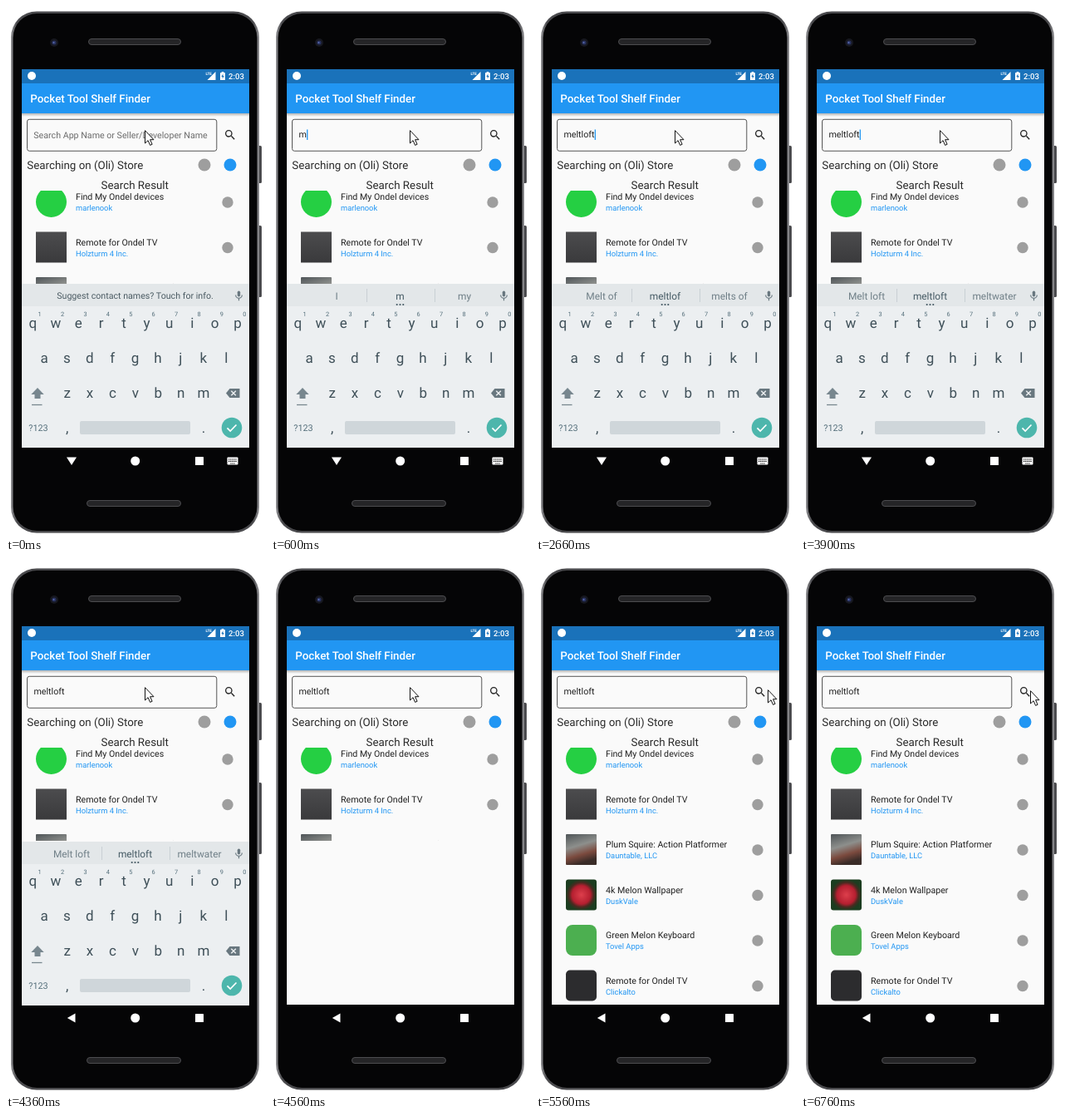
An HTML page for the animation above (8000 ms loop, 312 by 636 pixels).

```html
<!DOCTYPE html>
<html lang="en">
<head>
<meta charset="utf-8">
<title>Pocket Tool Shelf Finder</title>
<style>
html, body { margin: 0; width: 100%; height: 100%; overflow: hidden; background: #fff; }
svg { display: block; width: 312px; height: 636px; font-family: Roboto, "Open Sans", sans-serif; text-rendering: geometricPrecision; }
.mid { text-anchor: middle; }
.big { font-size: 13.33px; fill: #2b2b2b; }
.body { font-size: 10.67px; fill: #212121; }
.sub { font-size: 9.33px; fill: #2196f3; }
.key { font-size: 17px; fill: #3f5059; }
.num { font-size: 7.4px; fill: #546e7a; }
.sug { font-size: 11.9px; fill: #6f7f87; }

#hint, #pointer, #splash, #board, #clip, .down, .back { animation: 8s linear infinite; }
#hint { animation-name: hint; }
#pointer { animation-name: point; }
#splash { animation-name: splash; transform-origin: 270px 155px; }
#board { animation-name: board; animation-timing-function: step-end; }
#clip { animation-name: grow; animation-timing-function: step-end; }
.down { animation-name: hide; animation-timing-function: step-end; }
.back { animation-name: show; animation-timing-function: step-end; }

@keyframes hint { 0%, 3.5% { opacity: 1; } 7.5%, 100% { opacity: 0; } }
@keyframes point {
  0%, 66.3% { transform: translate(167px, 149px); animation-timing-function: ease-in-out; }
  69.3%, 71.7% { transform: translate(279px, 152px); }
  72.8%, 100% { transform: translate(276px, 153px); }
}
@keyframes splash {
  0%, 80.6% { transform: scale(.4); opacity: 0; }
  80.75% { transform: scale(.6); opacity: .12; }
  81.6%, 83.2% { transform: scale(1); opacity: .17; }
  84.3%, 100% { transform: scale(1); opacity: 0; }
}
@keyframes board {
  0% { transform: none; opacity: 1; }
  54.4% { transform: translateY(1px); opacity: 1; }
  56.2% { transform: translateY(6px); opacity: .5; }
  56.9%, 100% { transform: translateY(6px); opacity: 0; }
}
@keyframes grow { 0% { height: 112px; } 58.2%, 100% { height: 309px; } }
@keyframes hide { 0% { visibility: visible; } 53.7%, 100% { visibility: hidden; } }
@keyframes show { 0% { visibility: hidden; } 53.7%, 100% { visibility: visible; } }
</style>
</head>
<body>
<svg viewBox="0 0 312 636">
  <defs>
    <linearGradient id="rim" x2="1">
      <stop stop-color="#8c8c8f"/><stop offset=".025" stop-color="#4a4a4d"/>
      <stop offset=".975" stop-color="#4a4a4d"/><stop offset="1" stop-color="#8c8c8f"/>
    </linearGradient>
    <linearGradient id="shade" x2="0" y2="1">
      <stop stop-color="#000" stop-opacity=".28"/><stop offset="1" stop-color="#000" stop-opacity="0"/>
    </linearGradient>
    <linearGradient id="slate" x2="0" y2="1"><stop stop-color="#4c4c4e"/><stop offset="1" stop-color="#3a3a3c"/></linearGradient>
    <linearGradient id="dusk" x2=".3" y2="1">
      <stop stop-color="#4f5558"/><stop offset=".45" stop-color="#8d8f8c"/>
      <stop offset=".75" stop-color="#7b4a3e"/><stop offset="1" stop-color="#3a2c28"/>
    </linearGradient>
    <radialGradient id="fruit">
      <stop stop-color="#dd3f4c"/><stop offset=".6" stop-color="#b51f30"/>
      <stop offset=".8" stop-color="#4a2a20"/><stop offset="1" stop-color="#1c3d20"/>
    </radialGradient>
    <clipPath id="listClip"><rect id="clip" x="19" y="222" width="274" height="112"/></clipPath>
    <clipPath id="inkClip"><rect x="253.5" y="130" width="39.5" height="50"/></clipPath>
  </defs>

  <!-- phone -->
  <g fill="#4b4b4e">
    <rect x="302" y="168" width="6" height="45" rx="1.5"/>
    <rect x="302" y="264" width="6" height="86" rx="1.5"/>
  </g>
  <rect x="6" y="6.500" width="299" height="627" rx="31" fill="url(#rim)"/>
  <rect x="8.500" y="9" width="294" height="622" rx="29" fill="#050506"/>
  <circle cx="58" cy="44" r="5" fill="#17181f"/>
  <circle cx="58" cy="44" r="2.600" fill="#27305c"/>
  <circle cx="57.500" cy="44" r="1.100" fill="#5b6bb0"/>
  <g fill="#252527" stroke="#4c4c4f">
    <rect x="99.500" y="39.500" width="111" height="7" rx="3.500"/>
    <rect x="97.500" y="594.500" width="113" height="7" rx="3.500"/>
  </g>

  <!-- app -->
  <rect x="19" y="76" width="274" height="455" fill="#fafafa"/>
  <rect x="19" y="129" width="274" height="4" fill="url(#shade)"/>
  <rect x="19" y="93" width="274" height="36" fill="#2196f3"/>
  <rect x="19" y="76" width="274" height="17" fill="#1a72ba"/>
  <g fill="#fff">
    <circle cx="31" cy="84" r="5"/>
    <text x="240.500" y="83" font-size="4.600" font-weight="700">LTE</text>
    <path d="M252.500 79v10h-10z"/>
    <path d="M259.700 79h2.600v1.200h1.700V89h-6v-8.800h1.700z"/>
    <path d="M261.400 81.500l-2 3.500h1.300v2.500l2-3.500h-1.300z" fill="#1a72ba"/>
    <text x="268" y="87.700" font-size="9.600" font-weight="500">2:03</text>
    <text x="29.300" y="115.500" font-size="13.330" font-weight="500">Pocket Tool Shelf Finder</text>
  </g>

  <g clip-path="url(#inkClip)"><circle id="splash" cx="270" cy="155" r="23"/></g>
  <rect x="25.500" y="136.300" width="228.300" height="38" rx="2.700" fill="none" stroke="#555"/>
  <text id="hint" class="body" x="33.300" y="158.500" style="fill:#6c6c6c">Search App Name or Seller/Developer Name</text>
  <text id="typed" class="body" x="33.500" y="158.200"></text>
  <rect id="caret" y="148.500" width="1.300" height="12.500" fill="#2196f3"/>
  <path transform="translate(262 147) scale(.667)" fill="#222" d="M15.500 14h-.79l-.28-.27A6.470 6.470 0 0 0 16 9.500 6.500 6.500 0 1 0 9.500 16c1.610 0 3.090-.59 4.230-1.570l.27.28v.79l5 4.990L20.490 19zm-6 0a4.500 4.500 0 1 1 0-9 4.500 4.500 0 0 1 0 9z"/>

  <text class="big" x="25.300" y="196">Searching on (Oli) Store</text>
  <circle cx="239" cy="191" r="7.500" fill="#9e9e9e"/>
  <circle cx="270" cy="191" r="7.500" fill="#2196f3"/>
  <text class="big mid" x="155.300" y="220">Search Result</text>
  <g clip-path="url(#listClip)"><g id="list"></g></g>

  <!-- navigation -->
  <g fill="#fff">
    <path class="down" d="M73 542.500h12l-6 9.500z"/>
    <path class="back" d="M83.500 541.500v11l-9.700-5.500z"/>
    <circle cx="155.700" cy="547" r="5.500"/>
    <rect x="228" y="542" width="10" height="10" rx=".6"/>
    <g class="down">
      <rect x="266.500" y="542.500" width="13" height="9" rx="1"/>
      <path d="M268 545h10M268 547.300h10M270.300 550h5.400" stroke="#050506" stroke-width="1.200" stroke-dasharray="1.300 .8"/>
    </g>
  </g>

  <!-- keyboard -->
  <g id="board">
    <rect x="19" y="334" width="274" height="197" fill="#eceff1"/>
    <rect x="19" y="334" width="274" height="27" fill="#e3e7e9"/>
    <text id="ask" class="mid" x="155.500" y="352" font-size="10.670" fill="#4b5b63">Suggest contact names? Touch for info.</text>
    <g id="strip">
      <path d="M115.500 340v16M197.500 340v16" stroke="#c9d0d4"/>
      <text class="sug mid" x="79" y="352.500"></text>
      <text class="sug mid" x="155.500" y="352.500" style="fill:#455a64"></text>
      <text class="sug mid" x="233" y="352.500"></text>
      <g fill="#455a64"><circle cx="151.700" cy="359" r="1.100"/><circle cx="155.500" cy="359" r="1.100"/><circle cx="159.300" cy="359" r="1.100"/></g>
    </g>
    <g fill="none" stroke="#68777f" stroke-width="1.200">
      <rect x="278.800" y="342.500" width="3.400" height="7" rx="1.700" fill="#68777f" stroke="none"/>
      <path d="M276.700 347.500a3.800 3.800 0 0 0 7.600 0M280.500 351.300v3"/>
    </g>
    <g id="keys"></g>
    <path d="M38 459l7.700 8h-4.200v5h-7v-5h-4.200z" fill="#78878f"/>
    <path d="M31 479.500h12.500" stroke="#78878f" stroke-width="1.300"/>
    <path d="M269.500 460h12v11h-12l-4.500-5.500z" fill="#68777f"/>
    <path d="M271.300 462.700l5.600 5.600m0-5.600l-5.600 5.600" stroke="#eceff1" stroke-width="1.400"/>
    <text class="mid" x="39" y="510.500" font-size="10.800" fill="#546e7a">?123</text>
    <rect x="89" y="499" width="133" height="16" rx="2" fill="#cfd6da"/>
    <circle cx="272" cy="507" r="12.300" fill="#4db6ac"/>
    <path d="M266.500 507.300l3.700 3.700 7.300-7.500" fill="none" stroke="#fff" stroke-width="1.700"/>
  </g>

  <g id="pointer">
    <path d="M.5 .7v15.300l3.600-3.300 2.500 5.700 2.500-1.100-2.500-5.600h4.400z" fill="#fff" stroke="#111"/>
  </g>
</svg>
<script>
const LOOP = 8000;
const $ = id => document.getElementById(id);

function add(parent, tag, attrs, text = '') {
  const el = document.createElementNS('http://www.w3.org/2000/svg', tag);
  for (const name in attrs) el.setAttribute(name, attrs[name]);
  el.textContent = text;
  parent.append(el);
}

// title, seller, picture fill, corner radius
const apps = [
  ['Find My Ondel devices', 'marlenook', '#25cf43', 18.5],
  ['Remote for Ondel TV', 'Holzturm 4 Inc.', 'url(#slate)', 0],
  ['Plum Squire: Action Platformer', 'Dauntable, LLC', 'url(#dusk)', 1],
  ['4k Melon Wallpaper', 'DuskVale', 'url(#fruit)', 3],
  ['Green Melon Keyboard', 'Tovel Apps', '#4caf50', 8],
  ['Remote for Ondel TV', 'Clickalto', '#2c2c2e', 5]
];
apps.forEach(([title, seller, fill, rx], i) => {
  const y = 217 + 54.5 * i, list = $('list');
  add(list, 'rect', { x: 36, y, width: 37, height: 37, rx, fill });
  add(list, 'text', { class: 'body', x: 84, y: y + 16 }, title);
  add(list, 'text', { class: 'sub', x: 84, y: y + 29 }, seller);
  add(list, 'circle', { cx: 267, cy: y + 19, r: 6.7, fill: '#9e9e9e' });
});

const rows = [['qwertyuiop', 32.4, 387], ['asdfghjkl', 46, 429], ['zxcvbnm', 73.6, 471], [',', 73.6, 512.5], ['.', 238, 512.5]];
rows.forEach(([letters, x0, y], row) => [...letters].forEach((letter, i) => {
  const x = x0 + 27.4 * i;
  add($('keys'), 'text', { class: 'key mid', x, y }, letter);
  if (row === 0) add($('keys'), 'text', { class: 'num mid', x: x + 8.3, y: 373.3 }, (i + 1) % 10);
}));

// each entry holds from its time until the next one
const word = 'meltloft';
const lengths = [[0, 0], [160, 1], [1000, 2], [1230, 3], [1300, 4], [1500, 5], [1760, 6], [1930, 7], [2660, 8]];
const carets = [[0, 0], [160, 1], [2500, 0], [2660, 1], [3330, 0], [3900, 1], [4200, 0]];
const guesses = [
  [0, ''], [400, 'I|m|my'], [830, 'M|m|me'], [1230, 'Me|me|met'], [1400, 'Melt|melt|belt'],
  [1660, 'Melt l|meltl|melts'], [1860, 'Melt lo|meltlo|melt to'],
  [2130, 'Melt of|meltlof|melts of'], [2760, 'Melt loft|meltloft|meltwater']
];
const at = (track, t) => track.findLast(([time]) => time <= t)[1];

const slots = $('strip').querySelectorAll('text');
let start;
function draw(now) {
  start ??= now;
  const t = (now - start) % LOOP;
  const text = word.slice(0, at(lengths, t));
  if ($('typed').textContent !== text) $('typed').textContent = text;
  $('caret').setAttribute('x', 33.7 + $('typed').getComputedTextLength());
  $('caret').style.visibility = at(carets, t) ? 'visible' : 'hidden';

  const guess = at(guesses, t);
  $('ask').style.visibility = guess ? 'hidden' : 'visible';
  $('strip').style.visibility = guess ? 'visible' : 'hidden';
  const parts = guess.split('|');
  slots.forEach((slot, i) => { slot.textContent = parts[i] || ''; });
  requestAnimationFrame(draw);
}
requestAnimationFrame(draw);
</script>
</body>
</html>
```
